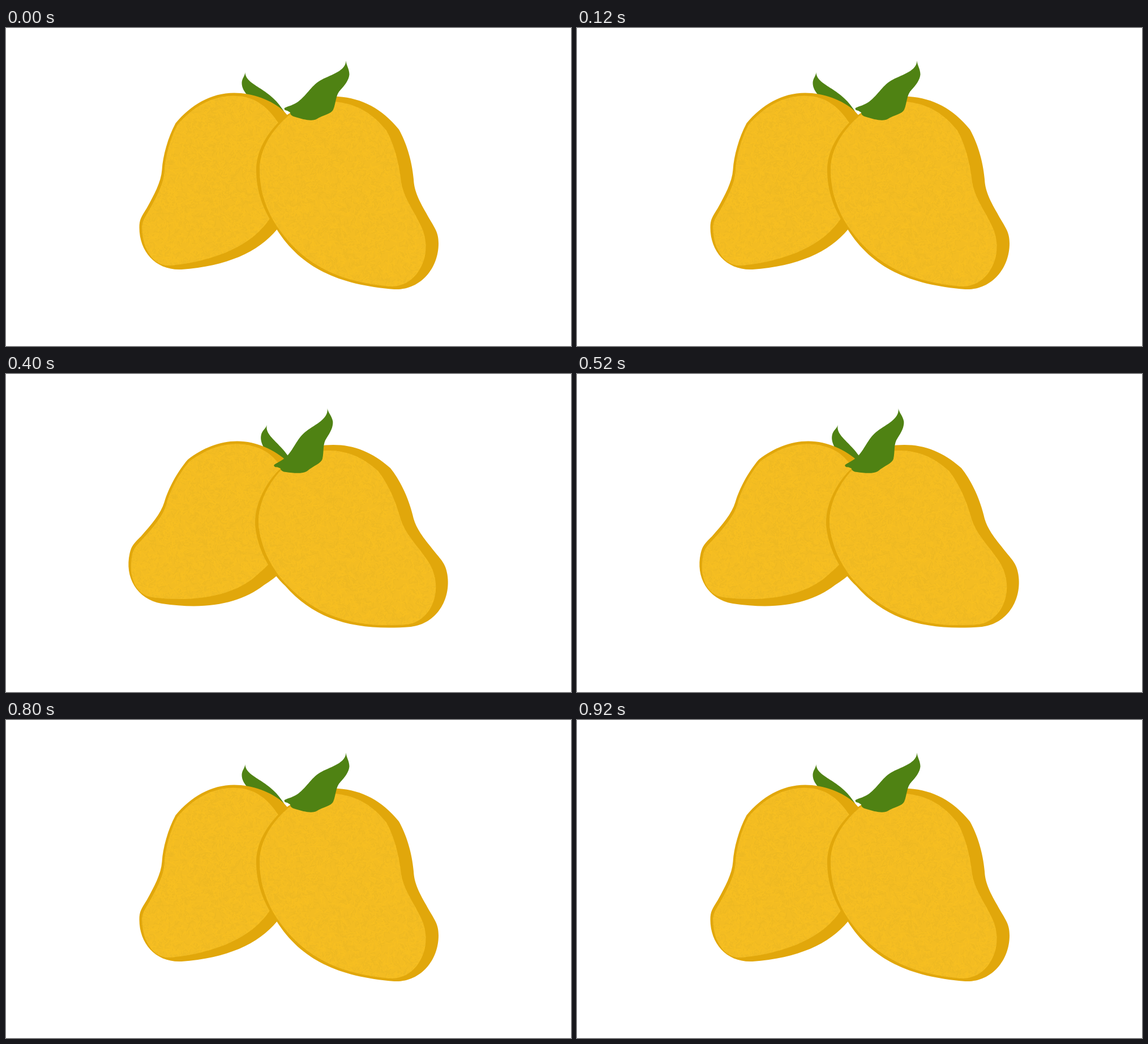
These frames come from a looping animation (998 px wide and 561 px high, 1 s). An HTML page with a canvas:

```html
<!DOCTYPE html>
<html lang="en">
<head>
<meta charset="utf-8">
<title>Swinging mangoes</title>
<style>
  html, body { margin: 0; width: 100%; height: 100%; overflow: hidden; background: #fff; }
  canvas { display: block; }
</style>
</head>
<body>
<canvas id="stage" width="998" height="561"></canvas>
<script>
const ctx = document.getElementById('stage').getContext('2d');
const RIM = '#e1a70b', SKIN = '#f3bc22', LIGHT = '#f7bf21', DARK = '#eeb922', LEAF = '#4f8213';
const SWING = [0, 0.38, 1, 0.38, 0]; // share of the full turn, one step per 200 ms
const STEP = 200;

const left = {
  pivot: [387.7, 257.2],
  turn: 12.6,
  leafBehind: true,
  box: [225, 110, 310, 320],
  rim: new Path2D(`M403 114.5C362 114.5 326 136 299.5 168C286 193 277 226 275.5 250
    C274 272 261 295 248.5 318C239 333 235.5 338 235.5 352C235.5 395 265 428 310 426
    C390 420 445 396 479 355C520 315 535 270 525 220C522 190 508 165 491 147
    C470 127 435 114.5 403 114.5Z`),
  skin: new Path2D(`M408 120C365 118 330 139 303 171C290 195 281 227 280 252
    C279 274 266 298 253 321C244 336 240.5 341 240.5 354C241 392 262 421 290 419
    C375 411 438 380 466 336C505 290 510 220 480 166C462 138 438 121 408 120Z`),
  leaf: new Path2D(`M422.5 78C423 102 465 104 491 147L445 138C430 122 416.5 112 416.5 97
    C416.5 89 422 85 422.5 78Z`)
};

const right = {
  pivot: [604.6, 268],
  turn: -9,
  leafBehind: false,
  box: [440, 120, 310, 345],
  rim: new Path2D(`M442 250C442 290 456 326 478 355C521 423 587 453 686 461
    C731 463 764 425 764 380C764 358 756 352 742 326C727 300 721 285 720 267
    C717 232 706 200 694 179C664 142 629 124 587 121C555 119 520 136 493 156
    C464 180 442 215 442 250Z`),
  skin: new Path2D(`M448 250C448 288 460 324 483 356C528 419 590 449 682 456
    C719 455 741.5 420 741.5 386C741.5 362 733 349 722 328C707 302 699 286 697 264
    C693 232 684 203 672 181C649 152 621 134 582 130C545 124 520 140 499 155
    C469 180 448 215 448 250Z`),
  leaf: new Path2D(`M600.5 57.5C600 76 575 82 558 91C540 100 533 117 516 130
    C508 136 498 138 492 141Q490 145 497 146L502 149Q502 155 511 157
    C524 161 539 165 548 161C561 153 574 152 578 144C583 132 582 118 591 109
    C599 100 605.5 92 606.5 82C606.5 72 601 66 600.5 57.5Z`)
};

let seed = 7;
const random = () => (seed = seed * 16807 % 2147483647) / 2147483647;

// Short curved hairs scattered over a box
function hairs([x, y, w, h], count) {
  const path = new Path2D();
  for (let i = 0; i < count; i++) {
    const px = x + random() * w, py = y + random() * h;
    const a = random() * 2 * Math.PI, bend = a + random() - 0.5;
    path.moveTo(px, py);
    path.quadraticCurveTo(px + 4 * Math.cos(a), py + 4 * Math.sin(a),
      px + 9 * Math.cos(bend), py + 9 * Math.sin(bend));
  }
  return path;
}

for (const fruit of [left, right])
  fruit.fuzz = [DARK, LIGHT, DARK, LIGHT].map(color => [color, hairs(fruit.box, 1300)]);

function fill(path, color) {
  ctx.fillStyle = color;
  ctx.fill(path);
}

function drawFruit(fruit, swing) {
  const [x, y] = fruit.pivot;
  ctx.save();
  ctx.translate(x, y);
  ctx.rotate(fruit.turn * swing * Math.PI / 180);
  ctx.translate(-x, -y);
  if (fruit.leafBehind) fill(fruit.leaf, LEAF);
  fill(fruit.rim, RIM);
  fill(fruit.skin, SKIN);
  ctx.save();
  ctx.clip(fruit.skin);
  ctx.lineWidth = 1.4;
  for (const [color, path] of fruit.fuzz) {
    ctx.strokeStyle = color;
    ctx.stroke(path);
  }
  ctx.restore();
  if (!fruit.leafBehind) fill(fruit.leaf, LEAF);
  ctx.restore();
}

let shown;
const start = performance.now();
function frame() {
  const elapsed = Math.max(0, performance.now() - start);
  const swing = SWING[Math.floor(elapsed / STEP) % SWING.length];
  if (swing !== shown) {
    shown = swing;
    ctx.fillStyle = '#fff';
    ctx.fillRect(0, 0, 998, 561);
    drawFruit(left, swing);
    drawFruit(right, swing);
  }
  requestAnimationFrame(frame);
}
frame();
</script>
</body>
</html>
```
